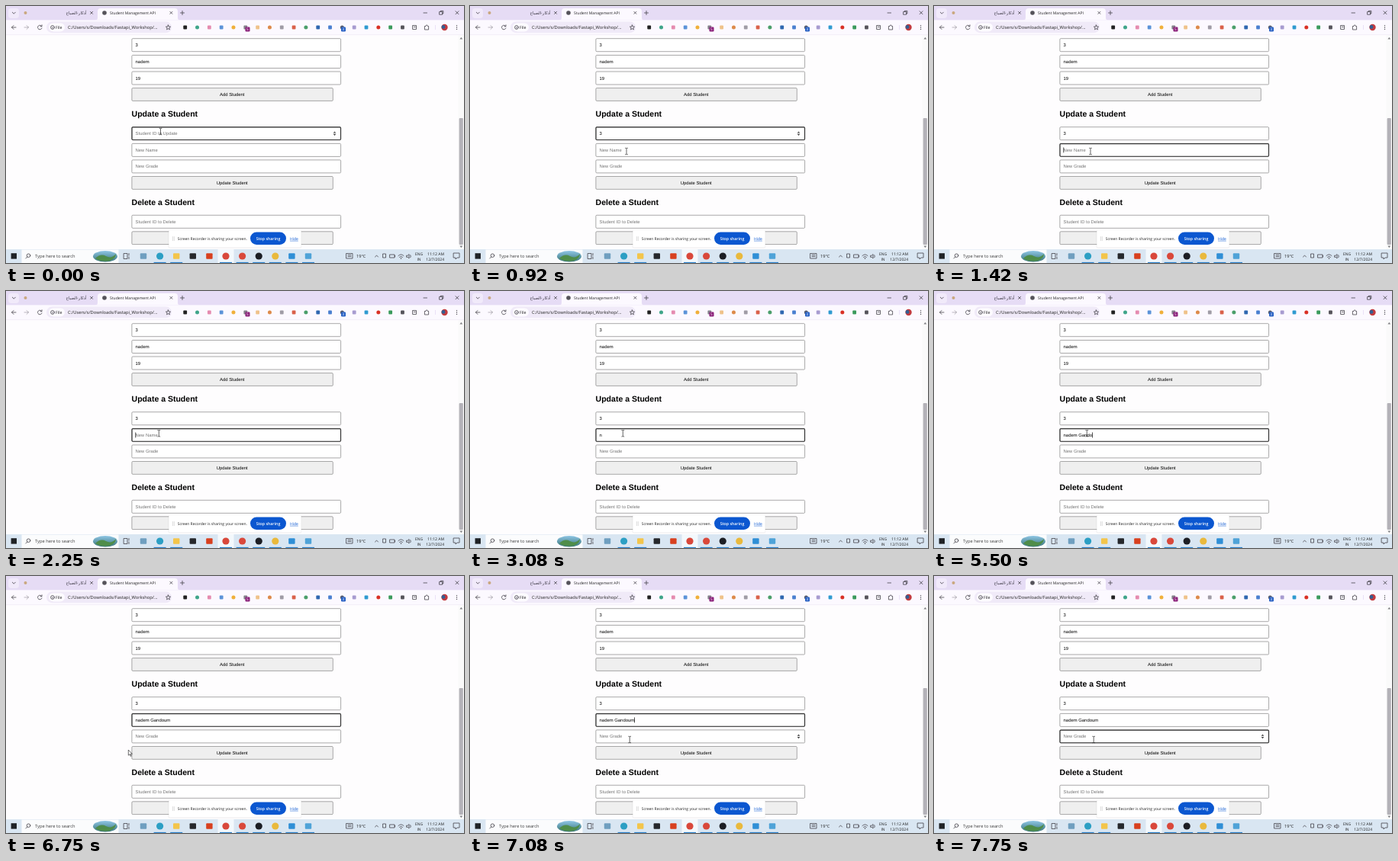
An HTML page that plays this animation: 600x337 px, repeating every 8 s.

```html
<!DOCTYPE html>
<html lang="en">
<head>
<meta charset="utf-8">
<title>Student form</title>
<style>
  html, body { margin: 0; width: 100%; height: 100%; overflow: hidden; background: #fff; }
  svg { display: block; width: 600px; height: 337px; }
  text { font-family: "Liberation Sans", Arial, sans-serif; font-size: 5.9px; text-rendering: geometricPrecision; white-space: pre; }
  .ui { font-family: "Open Sans", "Noto Sans", sans-serif; }
  .h { font-weight: bold; font-size: 10.52px; }
  .mid { text-anchor: middle; }
  .hint { fill: #757575; }
  .box { fill: #fff; stroke: #8c8c8c; stroke-width: .75; }
  .btn { fill: #efefef; stroke: #8c8c8c; stroke-width: .75; }
  .line { fill: none; stroke: #45424a; stroke-width: .8; stroke-linecap: round; stroke-linejoin: round; }
</style>
</head>
<body>
<svg id="stage" viewBox="0 0 600 337" xmlns="http://www.w3.org/2000/svg"></svg>
<script>
const LOOP = 8000;
const stage = document.getElementById('stage');

const rect = (x, y, w, h, fill, r = 0) =>
  `<rect x="${x}" y="${y}" width="${w}" height="${h}" rx="${r}" fill="${fill}"/>`;
const dot = (x, y, r, fill) => `<circle cx="${x}" cy="${y}" r="${r}" fill="${fill}"/>`;
const ring0 = (x, y, r) => `<circle class="line" cx="${x}" cy="${y}" r="${r}"/>`;
const line = d => `<path class="line" d="${d}"/>`;
const text = (x, y, s, cls = '', more = '') => `<text x="${x}" y="${y}" class="${cls}" ${more}>${s}</text>`;
const ui = (x, y, size, s, fill = '#1f1f1f', more = '') =>
  text(x, y, s, 'ui', `style="font-size:${size}px" fill="${fill}" ${more}`);

// Form parts; y is the vertical centre
const field = (y, value = '', cls = '', id = '') =>
  `<rect class="box" x="164.9" y="${y - 8.5}" width="273.7" height="17" rx="1.2"/>` +
  text(169.6, y + 2, value, cls, id && `id="${id}"`);
const button = (y, label) =>
  `<rect class="btn" x="164.9" y="${y - 8.4}" width="263.4" height="16.8" rx="1.2"/>` +
  text(296.3, y + 2, label, 'mid');

function tabs() {
  return rect(0, 0, 600, 19, '#e6dcf5') +
    rect(3, 3, 14, 13, '#f1eafa', 4) + line('M8.3 8.2l2 2 2-2') +
    dot(25.5, 9, 2, '#c9a77f') +
    ui(78.5, 11, 5.4, 'أذكار-الصباح', '#3d3944') +
    line('M110.6 7.4l3 3m0-3l-3 3') +
    `<path d="M117 18.5q3 0 3-3V7q0-4 4-4h97q4 0 4 4v8.5q0 3 3 3z" fill="#fcf9ff"/>` +
    dot(129, 9, 2.8, '#55535a') +
    ui(136, 10.8, 5.05, 'Student Management API') +
    line('M214.9 7.4l3 3m0-3l-3 3') + line('M228.5 9h5m-2.5-2.5v5') +
    line('M547 9h4.5M589 6.8l4 4m0-4l-4 4') +
    line('M568 7.6h3.6v3.6h-3.6zM569.2 7.6v-1.2h3.6v3.6h-1.2');
}

function toolbar() {
  const ext = ['#222', '#3fa58a', '#e58bb0', '#5b93d8', '#f0b03a', '#85828c', '#efc28a', '#dd8a4a',
    '#a09ca6', '#d9604a', '#4a9e6a', '#2f67b0', '#4a7fd0', '#5a5f70', '#a79bd0', '#2f9ad0',
    '#d93025', '#3a9a5c', '#55535a'];
  const icons = ext.map((c, i) => {
    const x = 234.7 + i * 15.82;
    return i % 3 == 1 ? dot(x, 28, 2.5, c) : rect(x - 2.4, 25.6, 4.8, 4.8, c, 1);
  }).join('');
  const badge = (x, n, c) => rect(x - 3, 27.5, 6, 6, c, 1.2) + ui(x - 1.4, 32.3, 4.6, n, '#fff');
  return rect(0, 18.4, 600, 19.6, '#fcf9ff') +
    line('M13 28H7.5m2.5-2.5L7.5 28l2.5 2.5') +
    `<g opacity=".45">${line('M24 28h5.5m-2.5-2.5l2.5 2.5-2.5 2.5')}</g>` +
    line('M46.7 26.5a2.8 2.8 0 1 0 .3 2.5M47 24.8v2h-2') +
    rect(53, 20.6, 164, 14.6, '#f0eaf8', 7.3) + rect(56, 22.4, 21, 11, '#fdfbff', 5.5) +
    ring0(61, 28, 2.4) + line('M61 27.8v1.2') +
    ui(65, 30, 5.3, 'File') +
    ui(81, 30.1, 5.78, 'C:/Users/s/Downloads/Fastapi_Workshop/...') +
    line('M212.5 25l.9 2 2.2.2-1.7 1.5.5 2.2-1.9-1.2-1.9 1.2.5-2.2-1.7-1.500 2.200-.2z') +
    icons + badge(316.5, '5', '#8a1f7a') + badge(442, '3', '#2b62c4') +
    line('M533 25.500h4.500v5H533zM534.300 27.500h2M548.800 26.500h1.200q0-1.500 1.200-1.500t1.200 1.500h1.200v4.500h-4.800z') +
    rect(562.3, 25, .5, 6, '#d8c8ee') + dot(574.5, 28, 4.2, '#c23b3f') + dot(573, 27.5, 2.4, '#345f92') +
    [25.6, 28, 30.4].map(y => dot(590.5, y, .7, '#45424a')).join('') +
    rect(0, 37.6, 600, .5, '#e7e1ee');
}

function page() {
  return rect(0, 38, 600, 281, '#fefdfe') +
    field(51.2, '3') + field(73, 'nadem') + field(94.5, '19') + button(116, 'Add Student') +
    text(164.6, 145, 'Update a Student', 'h') +
    field(167.2, '', '', 'idText') + field(188.9, '', '', 'nameText') +
    field(210.4, 'New Grade', 'hint') + button(231.9, 'Update Student') +
    text(164.6, 260.6, 'Delete a Student', 'h') +
    field(282.8, 'Student ID to Delete', 'hint') + button(304.2, '') +
    rect(592.5, 38, 7.5, 281, '#fafafa') + rect(593.6, 147, 5.2, 166, '#b4b2b8', 1) +
    `<path d="M594.4 43.5l1.9-2.5 1.9 2.5zM594.4 314.5l1.9 2.5 1.9-2.5z" fill="#7c7c80"/>`;
}

function shareBar() {
  const grip = [0, 2, 4].map(d => dot(218.3, 303 + d, .45, '#777') + dot(220.2, 303 + d, .45, '#777')).join('');
  return rect(212.6, 293.4, 174.6, 24, '#0001', 2) + rect(213.3, 293.6, 173.4, 23, '#fff', 1.5) + grip +
    ui(224.7, 306.8, 4.98, 'Screen Recorder is sharing your screen.') +
    rect(320, 296.5, 47, 16.4, '#0b57d0', 8.2) +
    ui(343.5, 306.8, 5.25, 'Stop sharing', '#fff', 'text-anchor="middle" font-weight="600"') +
    ui(372, 306.8, 5, 'Hide', '#0b57d0', 'text-decoration="underline"');
}

function taskbar() {
  const apps = ['#6f9fc0', '#2c9fc4', '#f3c54b', '#26282c', '#d8401f', '#d9483b', '#d9483b', '#1c1e24', '#e9b93c', '#2f8fd6', '#4fa3d8'];
  const icons = apps.map((c, i) => {
    const x = 180 + i * 21.6, on = i == 1 || i == 2 || i > 4;
    const shape = [1, 5, 6, 7, 8].includes(i) ? dot(x, 328, 4.6, c) : rect(x - 4.2, 324.2, 8.4, 7.6, c, 1);
    return (i == 5 ? rect(x - 10.5, 319, 21, 18, '#f3f8fc') : '') + shape +
      (on ? rect(x - 8, 335.9, 16, 1.1, '#2a7fc9') : '');
  }).join('');
  const end = 'text-anchor="end"', mid = 'text-anchor="middle"';
  return rect(0, 319, 600, 18, '#d9e6f2') + rect(6.6, 324.2, 7.4, 7.4, '#1f2226') +
    rect(20.5, 319.5, 127, 17.5, '#fbfcfd') + ring0(29.5, 327.2, 2.3) + line('M27.8 329l-2 2') +
    ui(38, 330.2, 5.76, 'Type here to search', '#3c3c3c') +
    `<ellipse cx="130" cy="328.3" rx="16" ry="7.2" fill="url(#hill)"/>` +
    `<path d="M117 331q7-7 14-3t13-3q0 6-8 9-12 2-19-3z" fill="#4f8d4a"/>` +
    line('M154.5 324.5h4.5v7h-4.5zM161 324.5v2.5m0 2v2.5') + icons +
    line('M446 324.5h8v6.500h-8zM448 326.500h4m-4 2h4') +
    ui(459, 330.2, 5.6, '19°C') +
    line('M483.5 329l2-2 2 2') +
    line('M494 325h3.5v5H494zM503 326h6v4h-6zM509.5 327.2v1.6') +
    line('M514 327.5q3.5-3.5 7 0m-5.5 1.8q2-2 4 0') + dot(517.5, 331, .8, '#45424a') +
    line('M525 327.2h1.3l1.7-1.7v5.5l-1.7-1.7H525zm4.8-.6q1.2 1.6 0 3.2') +
    ui(541, 326.6, 5, 'ENG', '#1f1f1f', mid) + ui(541, 334.2, 5, 'IN', '#1f1f1f', mid) +
    ui(574, 326.6, 5.06, '11:12 AM', '#1f1f1f', end) + ui(574, 334.2, 5, '12/7/2024', '#1f1f1f', end) +
    line('M586.5 324h7.5v6h-3l-2 2v-2h-2.5z');
}

stage.innerHTML = `<defs><linearGradient id="hill" x2="0" y2="1">
    <stop stop-color="#8ec5e4"/><stop offset="1" stop-color="#39757a"/></linearGradient></defs>` +
  page() +
  `<rect id="ring" x="165" width="273.5" height="16.6" rx="1.2" fill="none" stroke="#333" stroke-width="1.15"/>
   <path id="spin" d="M428.6 -.6l1.9-2.2 1.9 2.2zM428.6 .6l1.9 2.2 1.9-2.2z" fill="#444"/>
   <rect id="caret" width=".7" height="7" fill="#000"/>` +
  shareBar() + tabs() + toolbar() + taskbar() +
  `<path id="beam" d="M-1.8-4.2h1.3l.5.5.5-.5h1.3M0-3.7v7.4M-1.8 4.2h1.3l.5-.5.5.5h1.3" fill="none" stroke="#222" stroke-width=".7"/>
   <path id="arrow" d="M0 0v7.2l1.7-1.5 1.2 2.7 1.1-.5-1.2-2.6h2.3z" fill="#fff" stroke="#111" stroke-width=".6"/>`;

const $ = id => document.getElementById(id);
const [idText, nameText, ring, spin, caret, beam, arrow] =
  ['idText', 'nameText', 'ring', 'spin', 'caret', 'beam', 'arrow'].map($);

const NAME = 'nadem Gandoum';
const NAME_KEYS = [2580, 3170, 3250, 3330, 3420, 3830, 4420, 4750, 4830, 5170, 5500, 5750, 5920];
const ID_KEY = 250, TO_NAME = 1250, TO_GRADE = 7250;
const RESETS = [ID_KEY, TO_NAME, ...NAME_KEYS, TO_GRADE]; // moments that restart the caret blink
const ROWS = [167.2, 188.9, 210.4];
const PATH = [ // time, x, y
  [0, 202.5, 164.5], [670, 202.5, 164.5], [920, 205, 190.5], [2170, 205, 190.5], [2250, 200.3, 186.7],
  [6340, 200.3, 186.7], [6580, 136, 249], [6750, 160.3, 228], [7080, 209.2, 214.5], [LOOP, 209.2, 214.5]];
const STEP = 1000 / 12;

function pointerAt(t) {
  const s = Math.floor((t + 4) / STEP) * STEP; // the pointer is sampled 12 times a second
  const i = Math.max(1, PATH.findIndex(p => p[0] >= s));
  const [a, b] = [PATH[i - 1], PATH[i]];
  const k = Math.min(1, (s + 4 - a[0]) / (b[0] - a[0]));
  return [a[1] + (b[1] - a[1]) * k, a[2] + (b[2] - a[2]) * k];
}

function fill(el, value, hint) {
  const s = value || hint;
  if (el.textContent !== s) el.textContent = s;
  el.setAttribute('class', value ? '' : 'hint');
}
const show = (el, on) => el.setAttribute('visibility', on ? 'visible' : 'hidden');
const place = (el, x, y) => el.setAttribute('transform', `translate(${x} ${y})`);

function draw(t) {
  const id = t >= ID_KEY ? '3' : '';
  const name = NAME.slice(0, NAME_KEYS.filter(k => k <= t).length);
  fill(idText, id, 'Student ID to Update');
  fill(nameText, name, 'New Name');

  const focus = t < TO_NAME ? 0 : t < TO_GRADE ? 1 : 2;
  const y = ROWS[focus];
  ring.setAttribute('y', y - 8.3);

  const [px, py] = pointerAt(t);
  const hover = px > 164.5 && px < 439 ? ROWS.findIndex(c => Math.abs(py - c) < 9) : -1;
  show(spin, focus != 1 || hover == 2);
  place(spin, 0, focus == 1 ? ROWS[2] : y);

  const typed = [id && idText, name && nameText, null][focus];
  place(caret, 169.5 + (typed ? typed.getComputedTextLength() + .2 : 0), y - 3.5);
  const since = t - Math.max(...RESETS.filter(r => r <= t));
  show(caret, t >= ID_KEY && Math.floor(since / 500) % 2 == 0);

  show(beam, hover >= 0);
  show(arrow, hover < 0);
  place(beam, px, py);
  place(arrow, px, py);
}

const start = performance.now();
(function tick() {
  draw((performance.now() - start) % LOOP);
  requestAnimationFrame(tick);
})();
</script>
</body>
</html>
```
